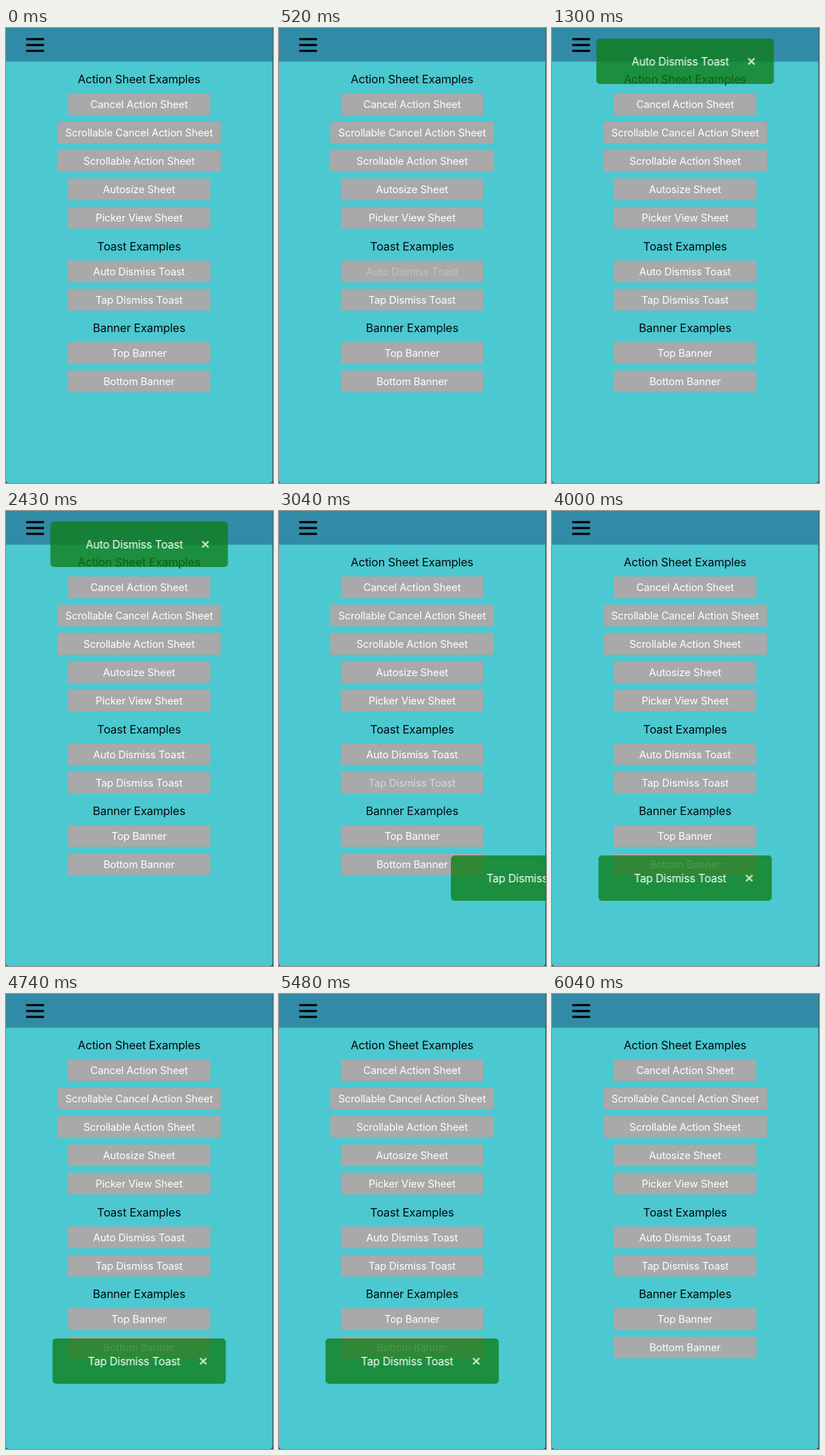
Recreate the animation shown at these times as an HTML page. Size 376x642 px, loop 6.08 s.

```html
<!DOCTYPE html>
<html lang="en">
<head>
<meta charset="utf-8">
<title>Sheets, toasts and banners</title>
<style>
  html, body { margin: 0; width: 100%; height: 100%; overflow: hidden; background: #29434a; }
  svg { display: block; width: 376px; height: 642px; font-family: Inter, "Open Sans", sans-serif; }
  .heading { font-size: 16.2px; letter-spacing: -.15px; text-anchor: middle; fill: #050808; }
  .label { font-size: 14.6px; letter-spacing: -.14px; text-anchor: middle; fill: #fff; }
  .button { fill: #a9a9a9; stroke: #9eaaab; stroke-width: .6; }
  .panel { fill: rgba(15, 125, 20, .77); }
  .message { font-size: 15.5px; letter-spacing: -.15px; fill: #fff; }
  .close { fill: none; stroke: #d3ecd6; stroke-width: 2.1; }
</style>
</head>
<body>
<svg id="stage" viewBox="0 0 376 642">
  <defs><clipPath id="screen"><path d="M0 0H375.2V638Q375.2 642 371 642H4Q0 642 0 638Z"/></clipPath></defs>
  <g id="app" clip-path="url(#screen)">
    <rect width="376" height="642" fill="#4cc8d1"/>
    <rect width="376" height="47.5" fill="#318ba7"/>
    <path d="M28.5 15.7H53.5M28.5 24H53.5M28.5 32.2H53.5" stroke="#000" stroke-width="3"/>
  </g>
</svg>
<script>
const LOOP = 6080, CENTER = 187.4;
const app = document.getElementById('app');

function add(parent, tag, attrs, text) {
  const el = document.createElementNS('http://www.w3.org/2000/svg', tag);
  for (const key in attrs) el.setAttribute(key, attrs[key]);
  if (text) el.textContent = text;
  return parent.appendChild(el);
}

// Each step is [time, value, easing]
function play(el, prop, steps) {
  const frames = steps.map(([time, value, easing = 'linear']) =>
    ({ offset: time / LOOP, [prop]: value, easing }));
  el.animate(frames, { duration: LOOP, iterations: Infinity });
}

function heading(y, text) {
  add(app, 'text', { class: 'heading', x: CENTER, y: y + 5.8 }, text);
}

function button(y, text, width = 200) {
  add(app, 'rect', { class: 'button', x: CENTER - width / 2, y: y - 15, width, height: 30 });
  return add(app, 'text', { class: 'label', x: CENTER, y: y + 5.4 }, text);
}

function press(label, down, up, end) {
  play(label, 'opacity', [[0, 1], [down, 1], [down + 80, .3], [up, .3], [end, 1], [LOOP, 1]]);
}

function toast({ x, y, width, text, enter, rest, leave, gone }) {
  const box = add(app, 'g', {});
  add(box, 'rect', { class: 'panel', width, height: 64, rx: 5 });
  add(box, 'text', { class: 'message', x: 49.7, y: 37.6 }, text);
  const cx = width - 31.7;
  add(box, 'path', { class: 'close', d: `M${cx - 4.4} 27.8l8.8 8.8m0 -8.8l-8.8 8.8` });
  const shown = `translate(${x}px, ${y}px)`, hidden = `translate(380px, ${y}px)`;
  play(box, 'transform', [
    [0, hidden], [enter, hidden, 'cubic-bezier(.42, 0, .58, 1)'],
    [rest, shown], [leave, shown, 'cubic-bezier(.42, 0, .58, 1)'],
    [gone, hidden], [LOOP, hidden]
  ]);
}

heading(72, 'Action Sheet Examples');
button(107.6, 'Cancel Action Sheet');
button(147.6, 'Scrollable Cancel Action Sheet', 230);
button(187.6, 'Scrollable Action Sheet', 230);
button(227.6, 'Autosize Sheet');
button(267.6, 'Picker View Sheet');
heading(307.8, 'Toast Examples');
const autoLabel = button(343.2, 'Auto Dismiss Toast');
const tapLabel = button(383.2, 'Tap Dismiss Toast');
heading(423.2, 'Banner Examples');
button(458.7, 'Top Banner');
button(498.7, 'Bottom Banner');

press(autoLabel, 400, 550, 950);
press(tapLabel, 2720, 2900, 3300);

toast({ x: 62.5, y: 15, width: 250, text: 'Auto Dismiss Toast',
  enter: 500, rest: 980, leave: 2460, gone: 2840 });
toast({ x: 65.5, y: 486, width: 244, text: 'Tap Dismiss Toast',
  enter: 2830, rest: 3285, leave: 5560, gone: 5980 });
</script>
</body>
</html>
```
